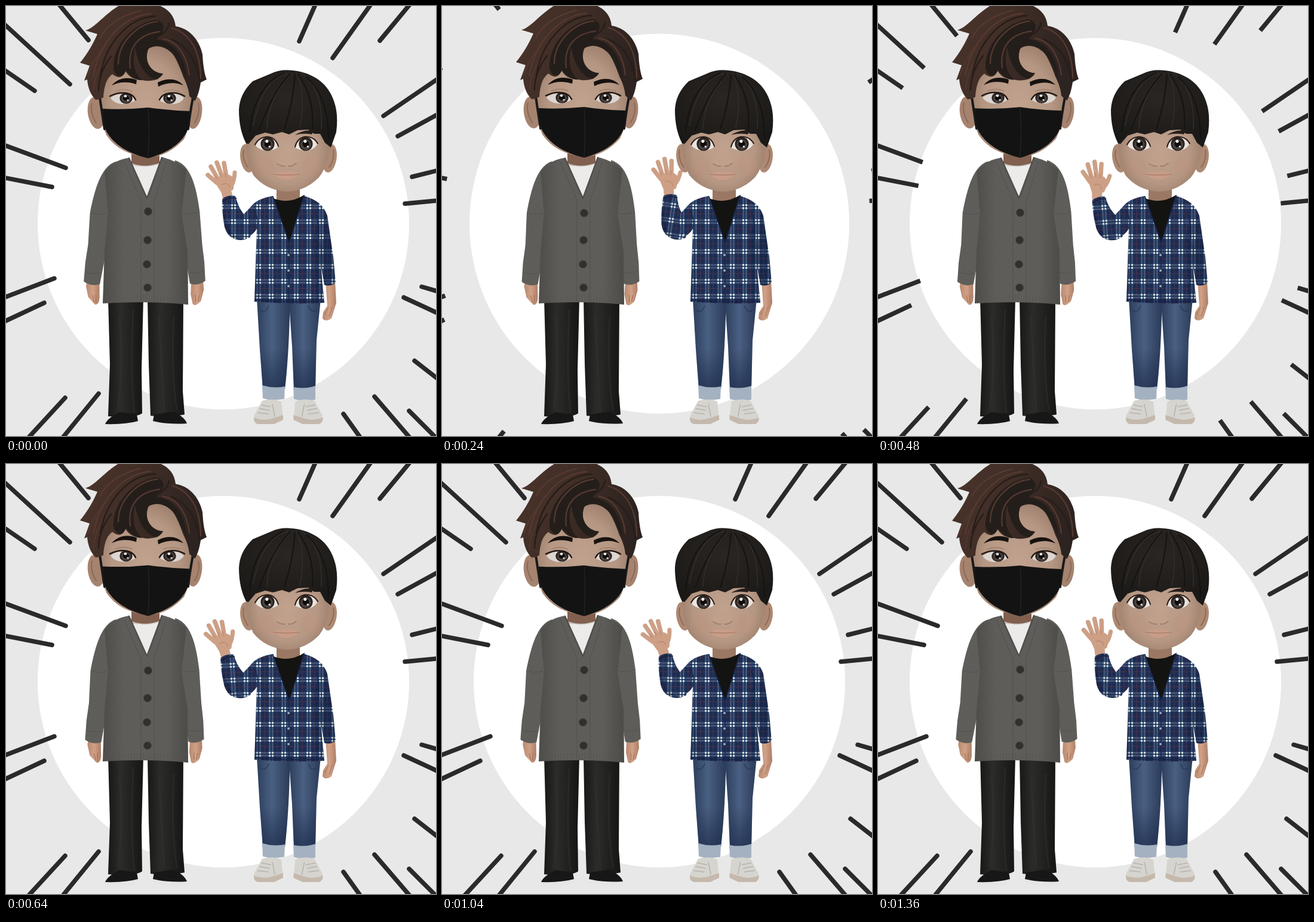
Recreate the animation shown at these times as an HTML page. Size 720 px wide and 720 px high, loop 1440 ms.

```html
<!DOCTYPE html>
<html lang="en">
<head>
<meta charset="utf-8">
<title>Two friends waving</title>
<style>
  html, body { margin: 0; height: 100%; overflow: hidden; background: #e8e8e8; }
  svg { display: block; width: 100vw; height: 100vh; }
  .stroke { fill: none; stroke-linecap: round; stroke-linejoin: round; }
</style>
</head>
<body>
<svg viewBox="0 0 720 720">
  <defs>
    <radialGradient id="skin" cx=".5" cy=".55" r=".6">
      <stop offset="0" stop-color="#c0a28e"/><stop offset=".6" stop-color="#b59783"/><stop offset="1" stop-color="#927563"/>
    </radialGradient>
    <linearGradient id="hand" x2="1">
      <stop offset="0" stop-color="#b98970"/><stop offset=".5" stop-color="#d0a186"/><stop offset="1" stop-color="#ad7e66"/>
    </linearGradient>
    <linearGradient id="brown" x2="1" y2=".3">
      <stop offset="0" stop-color="#4c352c"/><stop offset=".5" stop-color="#3f2d26"/><stop offset="1" stop-color="#2d2320"/>
    </linearGradient>
    <radialGradient id="black" cx=".5" cy=".35" r=".65">
      <stop offset="0" stop-color="#2a2623"/><stop offset="1" stop-color="#1b1917"/>
    </radialGradient>
    <linearGradient id="leather" x2="1">
      <stop offset="0" stop-color="#181817"/><stop offset=".35" stop-color="#2b2b29"/><stop offset=".7" stop-color="#20201f"/><stop offset="1" stop-color="#151514"/>
    </linearGradient>
    <linearGradient id="denim" x2="1">
      <stop offset="0" stop-color="#2d3e5d"/><stop offset=".45" stop-color="#4a6082"/><stop offset="1" stop-color="#2a3a58"/>
    </linearGradient>
    <linearGradient id="fade" x2="0" y2="1">
      <stop offset=".55" stop-color="#1c2b4b" stop-opacity="0"/><stop offset="1" stop-color="#1c2b4b" stop-opacity=".7"/>
    </linearGradient>
    <linearGradient id="sideShade" x2="1">
      <stop offset="0" stop-opacity=".18"/><stop offset=".25" stop-opacity="0"/><stop offset=".75" stop-opacity="0"/><stop offset="1" stop-opacity=".2"/>
    </linearGradient>
    <pattern id="knit" width="5" height="5" patternUnits="userSpaceOnUse" patternTransform="rotate(25)">
      <rect width="5" height="5" fill="#5f5e5a"/><path d="M0 2.5H5" stroke="#5b5a56"/>
    </pattern>
    <pattern id="plaid" width="21" height="25" patternUnits="userSpaceOnUse" patternTransform="translate(416 328)">
      <rect width="21" height="25" fill="#1c2c50"/>
      <path d="M7 0V25M0 8H21" stroke="#33547f" stroke-width="9" opacity=".4"/>
      <path d="M17 0V25M0 20H21" stroke="#613549" opacity=".7"/>
      <path d="M4.500 0V25M9.500 0V25M0 5.500H21M0 10.500H21" stroke="#a9bccb" opacity=".4"/>
      <path d="M3 5.500h3m2 0h3M3 10.500h3m2 0h3" stroke="#d5dedd" stroke-width="3"/>
    </pattern>
    <g id="iris">
      <circle r="10.5" fill="#29221f"/><circle r="8" cy="1" fill="#4c423e"/><circle r="5" fill="#0e0c0b"/>
      <circle cx="-1" cy="-4" r="2.3" fill="#fff"/><circle cx="3" cy="4" r="1.6" fill="#ddd"/>
    </g>
    <path id="coat" d="M206 254C190 257 176 262 165 278L171 350 165 410 162 498Q236 493 305 500L304 410 294 350 302 274Q285 258 260 253L237 322Z"/>
    <path id="leftLeg" d="M420 490H476L475 520Q473 590 467 641H430L425 575Z"/>
    <path id="rightLeg" d="M474 490H527L520 560 518 641H482L479 570 475 512Z"/>
  </defs>

  <rect width="720" height="720" fill="#e8e8e8"/>
  <circle id="disc" cx="364" cy="364.5" r="311" fill="#fff"/>
  <g id="rays" stroke="#2a2a2a" stroke-width="7.5"></g>

  <!-- tall figure -->
  <g fill="url(#leather)">
    <path d="M171 490H230L227 610 228 682Q215 691 171 687L174 600Z"/>
    <path d="M237 490H297L296 645 299 684Q272 690 242 686L239 600Z"/>
  </g>
  <path class="stroke" d="M190 520Q197 610 187 675M213 510Q208 620 215 680M256 520Q261 610 265 678M281 520Q276 610 286 675" stroke="#363633" stroke-width="3" opacity=".4"/>
  <g fill="#e6e6e6">
    <path d="M165 700Q164 709 178 709L212 706 221 700V690H170Z"/>
    <path d="M304 700Q305 708 290 708L256 706 246 700V690H296Z"/>
  </g>
  <path d="M166 700Q170 690 190 680L219 684 221 695Q200 701 166 700ZM303 699Q299 688 280 679L248 684 246 695Q270 701 303 699Z" fill="#171717"/>
  <path d="M210 245H257V280H210Z" fill="#82604f"/>
  <path d="M203 264Q234 274 263 261L240 325Z" fill="#ecebea"/>
  <path class="stroke" d="M209 264Q235 273 259 263" stroke="#cfcecb" stroke-width="1.5"/>
  <g id="leftSleeve">
    <path d="M141 452H160L161 489Q160 502 153 500L142 488 138 470Z" fill="url(#hand)"/>
    <path class="stroke" d="M149 485L152 496M155 484V497" stroke="#9c6d57"/>
    <path d="M184 260C160 268 150 303 142 347L140 400 136 430 134 462Q147 471 161 466L176 380Z" fill="url(#knit)"/>
    <path class="stroke" d="M145 347Q157 351 170 347M137 446Q148 451 161 447" stroke="#53524e"/>
  </g>
  <g id="rightSleeve">
    <path d="M307 452H326L327 476 322 494Q312 505 308 499L305 483Z" fill="url(#hand)"/>
    <path class="stroke" d="M313 484V496M319 485L317 495" stroke="#9c6d57"/>
    <path d="M283 258C309 266 318 300 323 345L326 400 329 430 330 461Q317 470 304 465L292 380Z" fill="url(#knit)"/>
    <path class="stroke" d="M320 345Q309 350 295 347M327 444Q317 450 304 446" stroke="#53524e"/>
  </g>
  <use href="#coat" fill="url(#knit)"/>
  <use href="#coat" fill="url(#sideShade)"/>
  <path class="stroke" d="M206 255L236 322 261 254" stroke="#4f4e4b" stroke-width="2.5"/>
  <path class="stroke" d="M198 260Q216 305 226 325V494M268 260Q258 298 248 325V494M171 350Q165 420 164 470M294 350Q304 410 304 465" stroke="#52514d"/>
  <path d="M164 490H304" stroke="#52514d" stroke-width="13" stroke-dasharray="1 4" opacity=".5"/>
  <g fill="#30302e" stroke="#464542">
    <circle id="topButton" cx="238" cy="347" r="6.5"/><circle cx="237" cy="392" r="6.5"/>
    <circle cx="236" cy="432.500" r="6.5"/><circle cx="237" cy="471.500" r="6.5"/>
  </g>

  <g id="tallHead">
    <g fill="#a6836f">
      <ellipse cx="151" cy="178" rx="14" ry="27" transform="rotate(-8 151 178)"/>
      <ellipse cx="316" cy="178" rx="12" ry="27" transform="rotate(8 316 178)"/>
    </g>
    <path class="stroke" d="M144 162Q140 177 151 195M322 162Q326 177 316 195" stroke="#8a6a59" stroke-width="2"/>
    <path d="M156 120Q165 55 235 55T312 120Q316 185 298 222 270 252 238 252 190 248 168 215 153 175 156 120Z" fill="url(#skin)"/>
    <path class="stroke" d="M157 152Q162 185 165 205M313 152Q307 185 305 205" stroke="#191919" stroke-width="4"/>
    <path d="M162 171Q200 173 238 169 272 174 307 175 308 193 303 209 288 240 238 254 187 242 168 209 162 190 162 171Z" fill="#131313"/>
    <path class="stroke" d="M238 171Q241 210 238 252" stroke="#222" stroke-width="1.5"/>
    <path d="M175 153Q187 144 202 145 214 148 217 157 206 164 192 163 180 161 175 153ZM298 153Q288 144 273 145 260 148 257 157 268 164 282 163 294 161 298 153Z" fill="#dcd6d2"/>
    <use href="#iris" transform="translate(201 153.500) scale(1.020 .88)"/>
    <use href="#iris" transform="translate(274 153.500) scale(1.020 .88)"/>
    <path class="stroke" d="M174 150Q187 143 202 145 213 147 217 156M299 150Q288 143 273 145 261 147 257 156" stroke="#211713" stroke-width="2.5"/>
    <path class="stroke" d="M183 142Q198 136 211 142M264 142Q278 137 291 142" stroke="#80604f" stroke-width="1.2" opacity=".6"/>
    <path d="M177 132C188 119 203 117 219 123L218 130C203 125 190 126 177 132ZM254 127C270 119 287 120 297 132 283 126 270 127 255 134Z" fill="#17120f"/>
    <path d="M150 156C142 148 137 136 136 122L131 124 140 99 124 94C137 78 146 62 153 46L133 40C150 35 163 14 190-2H256C271 4 282 14 284 33 305 36 323 53 329 80 330 98 332 112 336 122L326 127C324 140 321 151 316 158L307 150C306 138 302 128 297 118 290 98 282 80 272 70 260 63 244 62 238 72 230 92 244 112 263 112 258 124 240 126 228 123 212 123 205 116 200 108 195 122 185 119 178 113 171 119 165 126 163 152L157 155Z" fill="url(#brown)"/>
    <path d="M253 22C212 27 178 65 180 105 186 121 196 119 201 107 211 121 224 124 228 123 212 110 212 89 216 68 221 98 235 120 253 122L263 112C245 112 230 95 238 71 252 61 280 66 294 105L302 121C301 84 280 57 252 55 266 41 269 28 253 22Z" fill="#241e1b"/>
    <g class="stroke" stroke="#573a30" stroke-width="2.2">
      <path d="M242 12C200 15 157 55 146 117M225 7C185 17 165 36 158 53M254 25C222 28 188 58 188 96M257 42C224 46 203 66 208 103M263 54C291 58 304 89 307 115M278 36C310 45 326 78 326 120"/>
      <path d="M147 139Q149 111 163 92M137 116Q144 91 166 65" opacity=".7"/>
    </g>
    <path class="stroke" d="M250 16C204 18 166 63 158 116M273 28C270 45 255 49 245 54M278 55C307 68 320 94 324 125M155 140Q155 111 176 83" stroke="#271d19" stroke-width="2.5"/>
  </g>

  <!-- short figure -->
  <g fill="url(#denim)"><use href="#leftLeg"/><use href="#rightLeg"/></g>
  <g fill="url(#fade)"><use href="#leftLeg"/><use href="#rightLeg"/></g>
  <path class="stroke" d="M426 509Q434 516 440 502M520 509Q512 516 506 502" stroke="#263755" stroke-width="1.3"/>
  <path d="M429 635Q448 641 467 637L466 658Q446 662 430 657ZM481 638Q501 642 518 636V659Q498 663 482 658Z" fill="#a4b1c1"/>
  <g id="shoe">
    <path d="M429 661Q446 656 461 662L464 692 449 699H421Q413 694 416 685Z" fill="#d6d4cf"/>
    <path d="M415 689Q432 696 448 690L464 685V693L449 700H421Q414 697 415 689Z" fill="#c4b9ac"/>
    <path class="stroke" d="M428 668L443 671M425 674L441 677M422 681L439 683M446 667L450 687" stroke="#b6b2ac" stroke-width="1.500"/>
  </g>
  <use href="#shoe" transform="translate(945.500) scale(-1 1)"/>
  <path d="M453 295H492V329H453Z" fill="#9a7864"/>
  <path d="M443 320Q472 334 500 316L490 365 474 400Z" fill="#131311"/>
  <path d="M535 460H551L553 497 545 523Q535 530 530 523L531 513 538 502Z" fill="url(#hand)"/>
  <path class="stroke" d="M540 504L534 517M546 504L541 520" stroke="#a0735c"/>
  <path d="M498 318Q529 325 538 351L548 420 552 464Q543 470 533 467L517 380Z" fill="url(#plaid)"/>
  <path d="M535 345L548 420 552 464Q543 470 533 467L519 385 530 404Z" fill="#07122d" opacity=".2"/>
  <g id="forearm">
    <g id="wave" class="stroke" stroke="#cda086">
      <path d="M371 319L365 296" stroke-width="17"/>
      <path d="M353 293Q371 280 378 291L377 305 363 309Z" fill="#cda086" stroke-width="8"/>
      <path d="M353 296L338 283M355 290L343 269M362 286L353 262M369 286L365 263" stroke-width="7.5"/>
      <path d="M375 303Q382 297 383 279" stroke-width="7"/>
      <path d="M353 289L350 284M361 286L358 280M368 286L367 279M361 299Q372 294 375 304" stroke="#b4866f" stroke-width="1.2"/>
    </g>
    <path d="M362 323Q371 316 384 318 389 337 397 347L414 367 409 387Q397 394 386 391 371 388 366 370 361 346 362 323Z" fill="url(#plaid)"/>
    <path d="M362 323Q365 354 377 379L398 391Q377 395 366 370Z" fill="#07122d" opacity=".25"/>
    <path class="stroke" d="M363 327Q373 320 385 322" stroke="#152142" stroke-width="2"/>
  </g>
  <path d="M447 318Q421 322 410 336L394 353 404 387Q414 383 420 373L416 495Q474 500 533 497L523 390 526 340Q515 321 498 318L474 397Z" fill="url(#plaid)"/>
  <path d="M420 370L416 495Q474 500 533 497L523 390 526 355 515 385 519 490H427Z" fill="#07122d" opacity=".2"/>
  <path class="stroke" d="M447 319L474 396 499 318M474 396V496M421 373Q422 354 417 345M524 390Q524 359 518 347M417 492Q474 497 532 494" stroke="#16244a" stroke-width="1.5"/>
  <g fill="#9dabb9"><circle cx="473" cy="417" r="2"/><circle cx="473" cy="443" r="2"/><circle cx="473" cy="469" r="2"/></g>

  <g fill="#ad8973">
    <ellipse cx="404" cy="255" rx="11.500" ry="24" transform="rotate(-9 404 255)"/>
    <ellipse cx="542" cy="255" rx="11.500" ry="24" transform="rotate(9 542 255)"/>
  </g>
  <path class="stroke" d="M398 241Q395 256 405 270M548 241Q551 256 541 270" stroke="#8d6d5a" stroke-width="2"/>
  <path d="M402 210Q405 155 473 155T542 210Q544 262 524 287 500 311 470 311 434 308 414 283 399 252 402 210Z" fill="url(#skin)"/>
  <g fill="#c49078" opacity=".2"><circle cx="433" cy="269" r="17"/><circle cx="511" cy="268" r="17"/></g>
  <path d="M418 234Q424 219 439 219 453 222 456 236 447 243 434 242 423 240 418 234ZM521 232Q515 219 500 219 486 223 484 237 494 243 506 242 516 240 521 232Z" fill="#e9e4e0"/>
  <use href="#iris" transform="translate(438 231) scale(1.1)"/>
  <use href="#iris" transform="translate(502 231) scale(1.1)"/>
  <path class="stroke" d="M417 232Q424 219 439 219 452 221 456 235M522 230Q515 218 500 219 487 222 484 236" stroke="#2a1c16" stroke-width="2"/>
  <path d="M484 216Q500 206 515 209L512 215Q498 212 484 216Z" fill="#251d19"/>
  <path d="M462 240Q461 254 452 260 451 269 463 267L469 270 477 267Q489 268 487 259 478 254 477 240Z" fill="#c2a08c" opacity=".7"/>
  <path class="stroke" d="M454 264Q461 269 467 268M473 268Q480 269 486 263" stroke="#8d6756" stroke-width="2" opacity=".55"/>
  <path d="M448 282Q460 274 470 278 480 274 492 282 482 291 470 291 458 291 448 282Z" fill="#c89c87"/>
  <path class="stroke" d="M449 282Q470 284 491 282" stroke="#966d5c" stroke-width="1.5" opacity=".6"/>
  <path d="M402 230Q390 207 390 174 391 147 413 126L444 113Q460 105 481 108 501 110 518 120 540 133 549 159 557 181 553 211L544 237 534 229 526 214 516 214 506 207 488 208 474 215 462 211 447 215 434 212 418 217 406 231Z" fill="url(#black)"/>
  <g class="stroke" stroke="#312c29" stroke-width="1.8">
    <path d="M472 113Q430 121 414 200M479 113Q439 153 437 205M487 112Q503 149 492 203M494 112Q531 137 528 205"/>
  </g>
  <path class="stroke" d="M466 112Q415 135 408 210M476 114Q445 145 424 208M484 116Q480 165 466 206M489 115Q517 152 513 206M503 119Q540 151 540 222" stroke="#151311" stroke-width="2"/>
</svg>

<script>
const FRAME = 80, LOOP = 1440;
const $ = id => document.getElementById(id);
const set = (el, attrs) => { for (const k in attrs) el.setAttribute(k, attrs[k]); };
const rotate = (id, angle, x, y) => set($(id), { transform: `rotate(${angle} ${x} ${y})` });

// edge x, y, tip x, y, distance still to travel at 480 ms
const rays = [
  [0, 33, 107, 131, 40], [0, 109, 48, 142, 8], [91, 0, 138, 57, 9],
  [0, 234, 100, 271, 27], [0, 288, 77, 303, 9.5], [0, 487, 81, 456, 11], [0, 527, 64, 497, 9],
  [41, 719, 99, 656, 21], [98, 719, 155, 649, 11],
  [517, 0, 491, 59, 16], [609, 0, 547, 87, 28], [674, 0, 626, 58, 22],
  [720, 124, 632, 184, 13.500], [720, 183, 656, 218, 17], [720, 276, 680, 286, 5.5], [720, 326, 668, 331, 6.5],
  [720, 477, 696, 470, 7], [720, 513, 666, 488, 11], [720, 622, 684, 594, 10],
  [672, 718, 617, 654, 11], [716, 719, 675, 678, 6], [590, 718, 565, 683, 13]
].map(([x, y, tipX, tipY, late]) => {
  const el = document.createElementNS('http://www.w3.org/2000/svg', 'line');
  const length = Math.hypot(x - tipX, y - tipY) + 12;
  const angle = Math.atan2(y - tipY, x - tipX);
  const ux = Math.cos(angle), uy = Math.sin(angle);
  set(el, { x1: tipX + ux * length, y1: tipY + uy * length });
  $('rays').append(el);
  return { el, tipX, tipY, ux, uy, length, late };
});

// time, cuff x, hand tilt
const waveKeys = [
  [80, 375, -20], [160, 382, -17], [240, 387, -8], [320, 384, -3], [480, 374, -5],
  [600, 372, -18], [700, 379, -20], [800, 381, -9], [920, 377, -9],
  [1040, 379, -23], [1200, 384, -13], [1360, 379, -10], [1440, 378, -18.5]
];

function wavePose(t) {
  const i = Math.max(1, waveKeys.findIndex(k => k[0] >= t));
  const [a, b] = [waveKeys[i - 1], waveKeys[i]];
  const p = (t - a[0]) / (b[0] - a[0]);
  return [1, 2].map(j => a[j] + (b[j] - a[j]) * p);
}

function draw(t) {
  set($('disc'), { r: 311 + 27 * Math.max(0, 1 - (t - 80) / 440) ** 3 });

  const left = (Math.max(0, 620 - t) / 140) ** 2;
  set($('rays'), { 'stroke-linecap': left ? 'butt' : 'round' });
  for (const { el, tipX, tipY, ux, uy, length, late } of rays) {
    const gap = late * left;
    set(el, { x2: tipX + ux * gap, y2: tipY + uy * gap, visibility: gap < length ? 'visible' : 'hidden' });
  }

  const breath = (t - 80) / (LOOP - 80);
  set($('tallHead'), { transform: `translate(0 ${breath})` });
  set($('topButton'), { cy: 347 - 3 * breath });
  rotate('leftSleeve', 1.2 * breath, 170, 280);
  rotate('rightSleeve', -1.2 * breath, 297, 280);

  const [cuff, tilt] = wavePose(t);
  const swing = (cuff - 378) * 0.95;
  rotate('forearm', swing, 398, 378);
  rotate('wave', tilt + 18.5 - swing, 372, 318);
}

function tick() {
  const t = Math.floor(performance.now() / FRAME) * FRAME % LOOP;
  draw(t || LOOP);
  requestAnimationFrame(tick);
}
tick();
</script>
</body>
</html>
```
